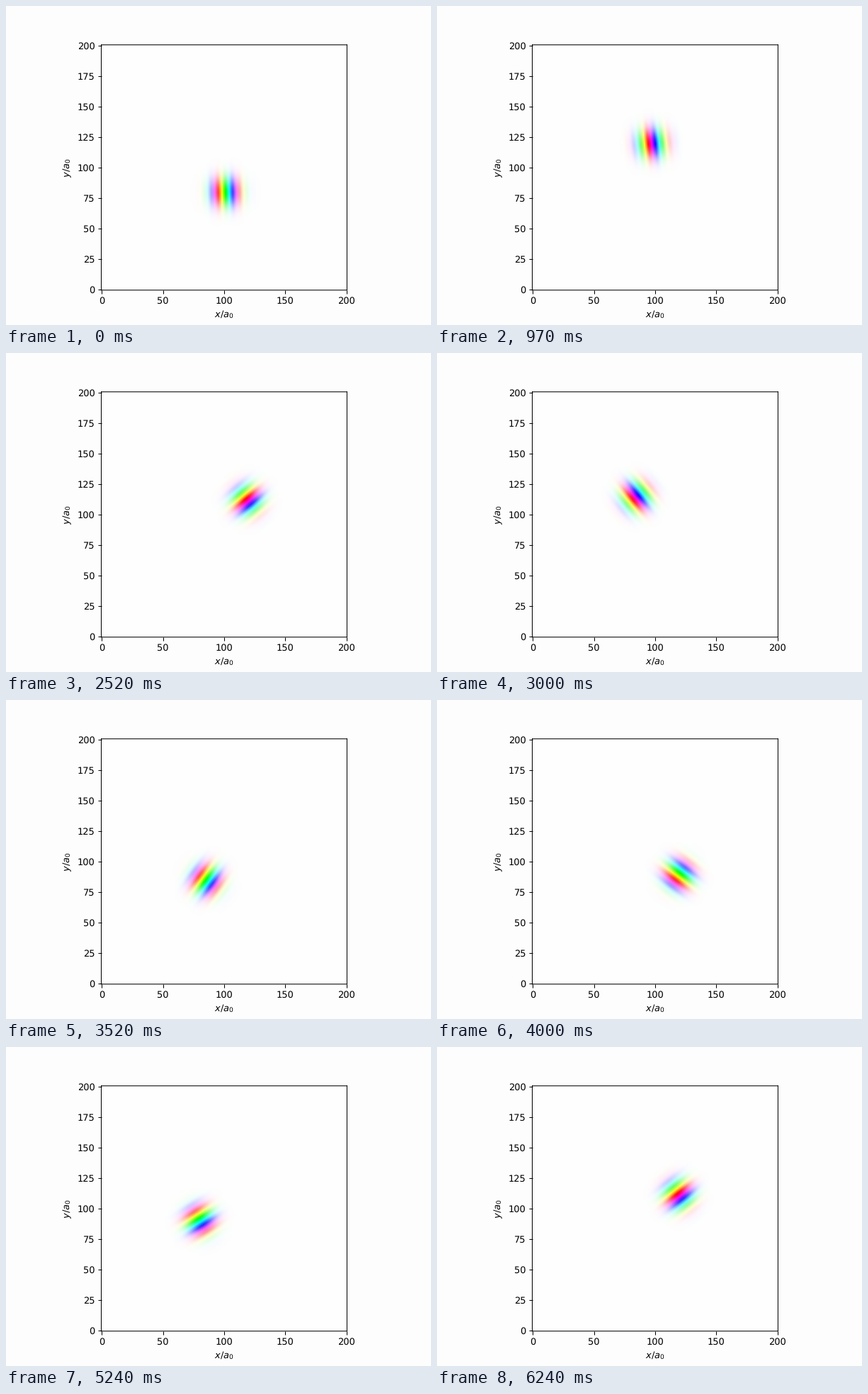
These frames come from a looping animation (600 px wide and 450 px high, 6.3 s). A matplotlib script:

```python
import numpy as np
import matplotlib.pyplot as plt
from matplotlib.animation import FuncAnimation
from matplotlib.colors import hsv_to_rgb

W, H = 600, 450
N = 201                   # grid points per side
MID = 100                 # centre of the trap
AX, AY = 23.0, 20.0       # orbit half-axes
L2 = 66.0                 # squared oscillator length
STEP = np.radians(8.07)   # orbit angle per simulation step
START = np.radians(2.0)
LAST_STEP = 149
LOOP_MS, TICK_MS = 6300, 20
STEPS_PER_MS = 0.024
PAPER = "#fefdfe"

y, x = np.mgrid[0:N, 0:N] - float(MID)


def packet(step):
    """Coherent state on an elliptic orbit: phase as hue, amplitude as saturation."""
    a = START + STEP * step
    cx, cy = AX * np.sin(a), -AY * np.cos(a)
    kx, ky = AX * np.cos(a) / L2, AY * np.sin(a) / L2
    amp = np.exp(-((x - cx) ** 2 + (y - cy) ** 2) / (2 * L2))
    phase = kx * (x - cx / 2) + ky * (y - cy / 2) - a
    hue = (phase / (2 * np.pi) + 1 / 3) % 1
    rgb = hsv_to_rgb(np.dstack([hue, amp, np.ones_like(amp)]))
    return np.round(rgb * 254).astype(np.uint8)


plt.rcParams["text.hinting"] = "no_hinting"
fig = plt.figure(figsize=(6.4, 4.8), dpi=93.75, facecolor=PAPER)
left, right, top, bottom = 134.5, 481.4, 54.8, 400.8
ax = fig.add_axes([left / W, 1 - bottom / H, (right - left) / W, (bottom - top) / H])
image = ax.imshow(packet(0), origin="lower", aspect="auto")
for spine in ax.spines.values():
    spine.set_snap(False)
ax.set_xticks(range(0, 201, 50))
ax.set_yticks(range(0, 201, 25))
ax.set_xlabel("$x/a_0$")
ax.set_ylabel("$y/a_0$")


def update(i):
    step = min(round(i * TICK_MS * STEPS_PER_MS), LAST_STEP)
    image.set_data(packet(step))
    return (image,)


anim = FuncAnimation(fig, update, frames=LOOP_MS // TICK_MS, interval=TICK_MS,
                     repeat=True, repeat_delay=0)
plt.show()
```
